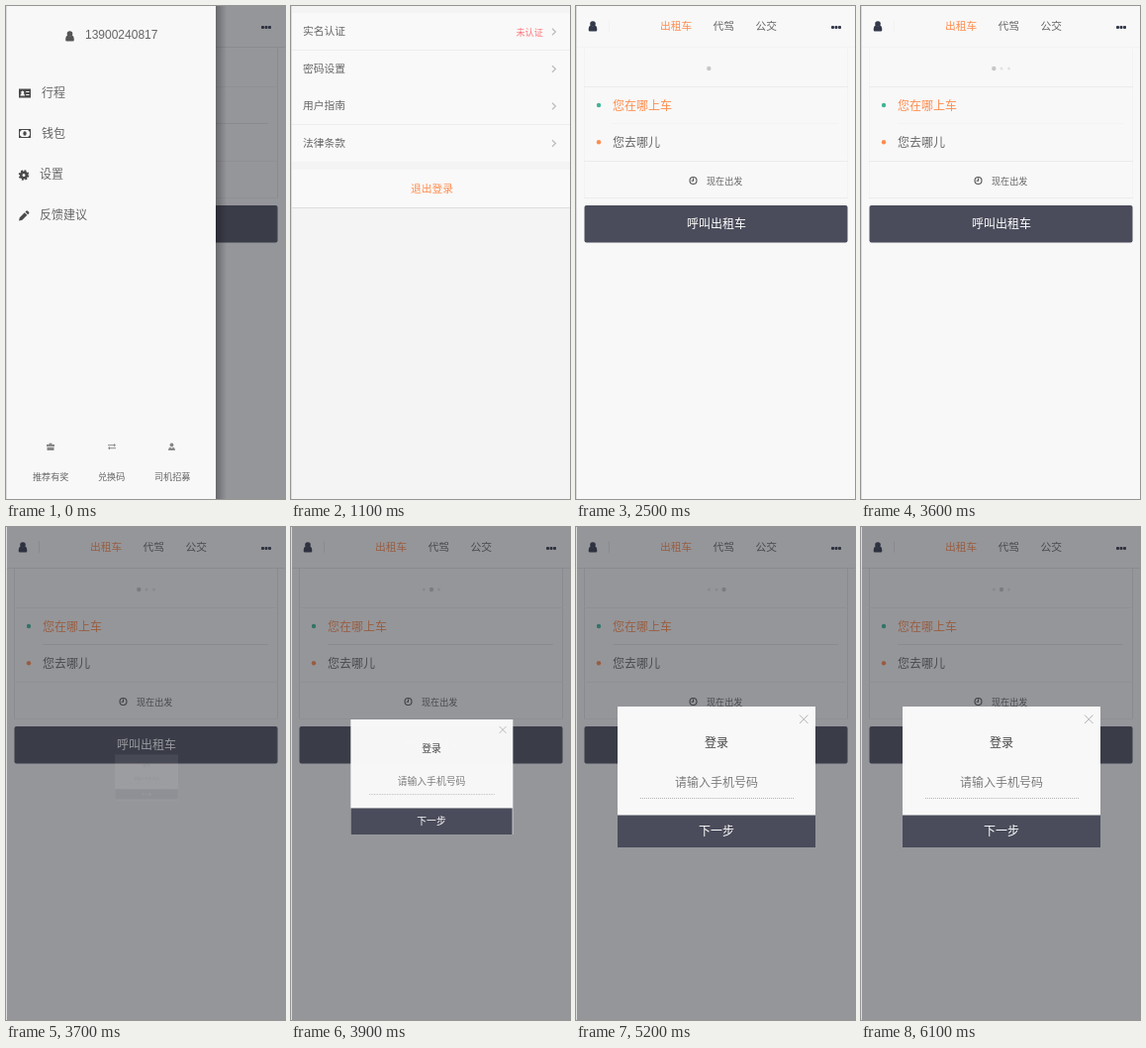
Animation, 282 px wide and 497 px high, one loop 6.2 s. Source, as an HTML page:

```html
<!DOCTYPE html>
<html lang="zh-CN">
<head>
<meta charset="utf-8">
<style>
html, body { margin: 0; width: 100%; height: 100%; overflow: hidden; background: #f8f8f8; }
svg { display: block; width: 282px; height: 497px; }
text { font: 12px "Noto Sans CJK SC", "Noto Sans CJK", sans-serif; fill: #666; }
.mid { font-size: 10.75px; }
.small { font-size: 9.1px; }
.num { font-family: "Liberation Sans", Arial, sans-serif; }
text.hot { fill: #ff8c4d; }
text.on { fill: #fff; font-weight: 500; }
.line { fill: none; stroke: #f3f3f4; }
.rule { stroke: #ececed; }
.dim .line { stroke: #e4e4e6; }
#modal { transform-box: fill-box; transform-origin: center; }
</style>
</head>
<body>
<svg viewBox="0 0 282 497">
  <defs>
    <g id="user"><circle r="2.8"/><path d="M-4.3 6.2q0-4.2 2.3-4.6q2 1.6 4 0q2.3.4 2.3 4.6q0 1.4-1.3 1.4h-6q-1.3 0-1.3-1.4z"/></g>
    <path id="arrow" d="M-2-3.2l3.4 3.2l-3.4 3.2" fill="none" stroke="#bbb" stroke-width="1.2"/>
    <linearGradient id="shade"><stop stop-opacity=".3"/><stop offset="1" stop-opacity="0"/></linearGradient>
  </defs>

  <g id="home">
    <rect width="282" height="497" fill="#f8f8f8"/>
    <g class="line">
      <path d="M0 41.5H282M33.5 14V26M37 118.5H265M8.5 42V194M274.5 42V194"/>
      <path class="rule" d="M8 81.5H275M8 156.5H275M8 193.5H275"/>
    </g>
    <use href="#user" x="17" y="18" fill="#33384a"/>
    <text class="mid hot" x="85" y="24">出租车</text>
    <text class="mid" x="138.5" y="24">代驾</text>
    <text class="mid" x="181.5" y="24">公交</text>
    <g fill="#33384a"><rect x="258" y="20" width="3" height="3" rx="1"/><rect x="261.5" y="20" width="3" height="3" rx="1"/><rect x="265" y="20" width="3" height="3" rx="1"/></g>
    <g id="dots" fill="#c6c7ca"><circle cx="134.3" cy="63"/><circle cx="142" cy="63"/><circle cx="149.5" cy="63"/></g>
    <circle cx="23" cy="100" r="2.2" fill="#3fb596"/>
    <text class="hot" x="37" y="104.5">您在哪上车</text>
    <circle cx="23" cy="137.3" r="2.2" fill="#ff8c4d"/>
    <text x="37" y="141.5">您去哪儿</text>
    <path d="M118.5 173.5v2.8h-2M122 176a3.5 3.5 0 1 1-7 0a3.5 3.5 0 1 1 7 0" fill="none" stroke="#555" stroke-width="1.1"/>
    <text class="small" x="132" y="179.5">现在出发</text>
    <rect x="8.5" y="201" width="266" height="37.5" rx="2" fill="#4a4c5b"/>
    <text class="on" x="112" y="224.3">呼叫出租车</text>
  </g>

  <rect id="veil" width="282" height="497" fill="#282a32" opacity=".48"/>

  <g id="drawer">
    <rect x="212" width="11" height="497" fill="url(#shade)"/>
    <rect width="212" height="497" fill="#f8f8f8"/>
    <use href="#user" x="64.5" y="28" fill="#555"/>
    <text class="num" x="80" y="33.2">13900240817</text>
    <g fill="#4a4a4a">
      <path fill-rule="evenodd" d="M13 83.500h12v9h-12zM14.500 90.500h4.500q0-2-1.300-2.300a1.500 1.500 0 1 0-1.900 0q-1.300.3-1.300 2.300zM20.200 86h3.300v1h-3.300zM20.200 89h3.300v1h-3.300z"/>
      <path fill-rule="evenodd" d="M13 124h12v9h-12zM14 126.500v4q1.500 0 1.500 1.500h7q0-1.500 1.500-1.500v-4q-1.500 0-1.500-1.500h-7q0 1.500-1.500 1.500z"/>
      <ellipse cx="19" cy="128.500" rx="1.700" ry="2.300"/>
      <path d="M13 216.500l.8-3.300l5-5l2.600 2.600l-5 5zM19.500 207.500l1-1q.8-.6 1.600.2l1 1q.7.800 0 1.500l-1 1z"/>
    </g>
    <g fill="none" stroke="#4a4a4a"><circle cx="18" cy="170.500" r="2.800" stroke-width="2.600"/><circle cx="18" cy="170.500" r="4.400" stroke-width="1.800" stroke-dasharray="1.900 1.556"/></g>
    <text x="36" y="92">行程</text>
    <text x="36" y="133">钱包</text>
    <text x="34" y="174.300">设置</text>
    <text x="34" y="215.300">反馈建议</text>
    <g fill="#888">
      <path d="M41 442h2.500v-1.300h3v1.300h2.500v2.300h-8zM41.500 445h7v3h-7z"/>
      <path d="M103 442.300h6v-1.300l2 1.800l-2 1.800v-1.300h-6zM111 445.300h-6v-1.300l-2 1.800l2 1.800v-1.300h6z"/>
      <circle cx="167.500" cy="442.500" r="1.900"/><path d="M164 448q0-3 2-3.300l1.500 1.300l1.500-1.300q2 .3 2 3.300z"/>
    </g>
    <text class="small" x="27" y="477.500">推荐有奖</text>
    <text class="small" x="93" y="477.500">兑换码</text>
    <text class="small" x="150" y="477.500">司机招募</text>
  </g>

  <g id="settings">
    <rect width="282" height="497" fill="#f4f4f4"/>
    <path d="M0 7H282V157H0zM0 165H282V203H0z" fill="#f9f9f9"/>
    <path d="M0 44.500H282M0 119.500H282" stroke="#ededed"/>
    <path d="M0 203.500H282" stroke="#dedede"/>
    <text class="mid" x="12" y="29.200">实名认证</text>
    <text class="mid" x="12" y="67">密码设置</text>
    <text class="mid" x="12" y="104.200">用户指南</text>
    <text class="mid" x="12" y="142.200">法律条款</text>
    <text class="small" x="227.500" y="29.500" style="fill:#ff7478">未认证</text>
    <use href="#arrow" x="266" y="26"/>
    <use href="#arrow" x="266" y="63.500"/>
    <use href="#arrow" x="266" y="101"/>
    <use href="#arrow" x="266" y="138.500"/>
    <text class="mid hot" x="121" y="188">退出登录</text>
    <rect id="bar" x="278" y="2" width="2" height="484" rx="1" fill="#999"/>
  </g>

  <g id="modal">
    <rect x="42" y="181" width="200" height="142" fill="#f8f8f8"/>
    <rect x="42" y="290.500" width="200" height="32.500" fill="#4a4c5b"/>
    <path d="M226 189.500l8.500 8.500M234.500 189.500l-8.500 8.500" stroke="#aaa" stroke-width=".9"/>
    <text x="130" y="221.800" style="fill:#444">登录</text>
    <text x="100" y="262.300" style="fill:#7c7c7c">请输入手机号码</text>
    <path d="M65 273.500H220" stroke="#b4b4b4" stroke-dasharray="1 1"/>
    <text class="on" x="124" y="311.300">下一步</text>
  </g>

  <rect width="1" height="497" fill="#dcdcdc"/>
</svg>
<script>
const LOOP = 6200, SETTINGS = 1100, HOME = 2500, LOGIN = 3680;
const ticks = [2500, 2700, 3000, 3300, 3600, 3800, 4100, 4400, 4700, 4900, 5200, 5500, 5800, 6100];
const $ = id => document.getElementById(id);
const show = (id, on) => $(id).style.display = on ? '' : 'none';

const zoom = $('modal').animate([
  { opacity: 0, transform: 'scale(.3)', easing: 'ease' },
  { opacity: 1, offset: .5 },
  { opacity: 1, transform: 'scale(1)' }
], { duration: 500, fill: 'both' });
zoom.pause();

function draw(t) {
  const menu = t < SETTINGS, login = t >= LOGIN;
  show('drawer', menu);
  show('settings', !menu && t < HOME);
  show('veil', menu || login);
  show('modal', login);
  $('home').classList.toggle('dim', menu || login);
  zoom.currentTime = Math.max(0, t - LOGIN);

  // Scrollbar flashes, then fades in steps
  const fade = Math.floor((t - 1500) / 100);
  $('bar').setAttribute('opacity', fade >= 0 && fade < 3 ? .4 * (1 - fade / 3) : 0);

  // One bright dot steps along; visited dots stay faint
  const step = ticks.filter(k => k <= t).length - 1;
  [...$('dots').children].forEach((dot, i) => {
    const lit = step >= 0 && step % 4 === i;
    dot.setAttribute('r', lit ? 2.2 : step > i ? 1.5 : 0);
    dot.setAttribute('opacity', lit ? 1 : .45);
  });
}

const start = performance.now();
function frame() {
  draw((performance.now() - start) % LOOP);
  requestAnimationFrame(frame);
}
frame();
</script>
</body>
</html>
```
